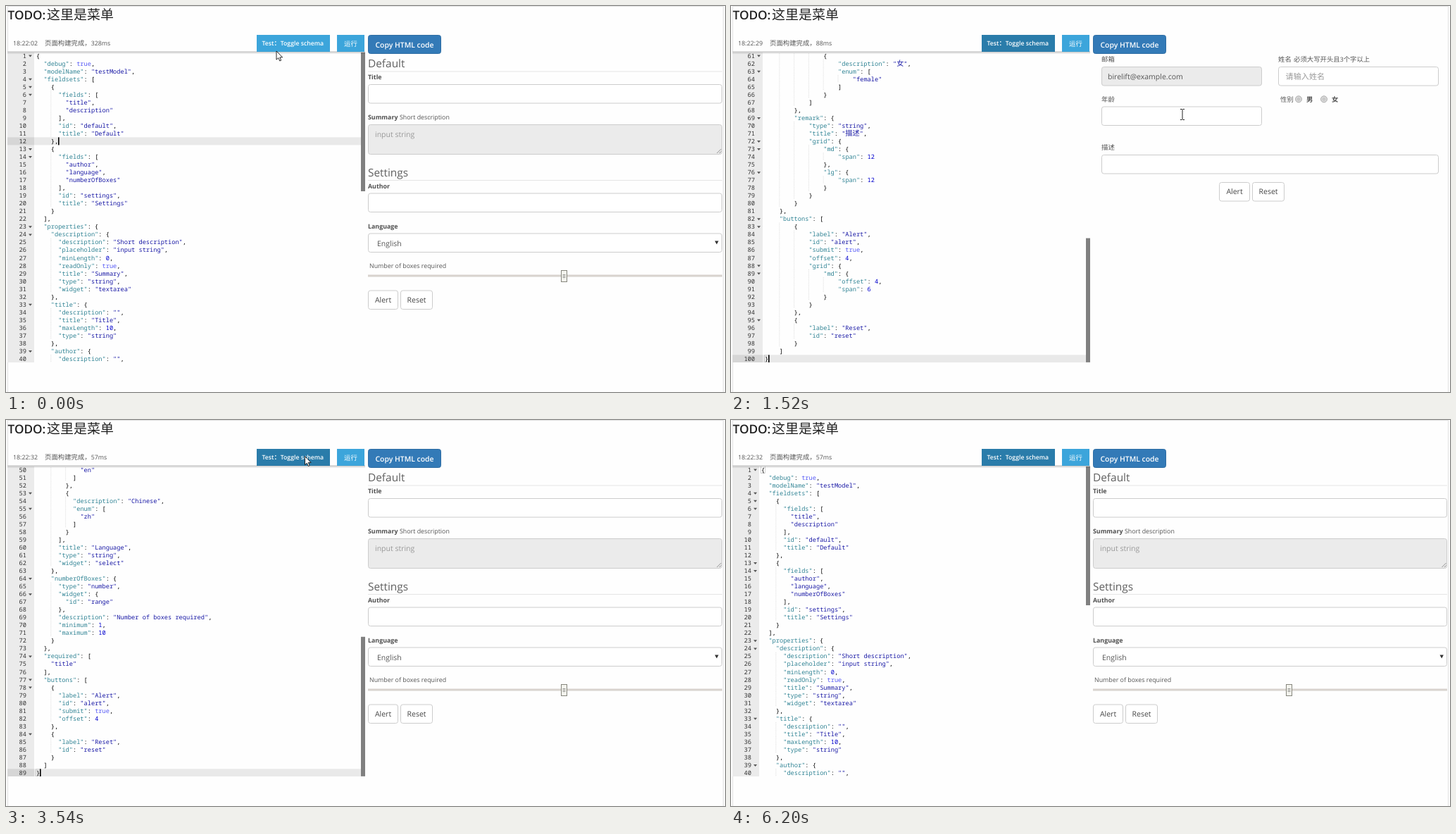
Animation of 1021x548 px, one loop 6.35 s. Source, as an HTML page:

```html
<!DOCTYPE html>
<html lang="zh-CN">
<head>
<meta charset="utf-8">
<title>Schema form editor</title>
<style>
html, body { margin: 0; width: 100%; height: 100%; overflow: hidden; background: #fefefe; }
#stage { display: block; width: 1021px; height: 548px; }
text { font-family: 'Open Sans', 'Noto Sans CJK SC', 'Noto Sans CJK', sans-serif; text-rendering: geometricPrecision; white-space: pre; }
.cjk { font-size: 1.06em; }
.code text { font: 8.667px 'Noto Sans Mono', 'Noto Sans CJK SC', 'Noto Sans CJK', monospace; }
.code .cjk { font-size: 10.2px; }
.key { fill: #318495; }
.str { fill: #1a1aa6; }
.num { fill: #0000cd; }
.bool { fill: #585cf6; }
</style>
</head>
<body>
<svg id="stage" viewBox="0 0 1021 548"></svg>
<script>
const LOOP = 6350, LINE = 11.035, CHAR = 5.2, TOP = 65, VIEW = 441;

const buttons = grid => [
  { label: 'Alert', id: 'alert', submit: true, offset: 4, ...grid },
  { label: 'Reset', id: 'reset' }
];
const option = (description, value) => ({ description, enum: [value] });

const fullSchema = {
  debug: true,
  modelName: 'testModel',
  fieldsets: [
    { fields: ['title', 'description'], id: 'default', title: 'Default' },
    { fields: ['author', 'language', 'numberOfBoxes'], id: 'settings', title: 'Settings' }
  ],
  properties: {
    description: {
      description: 'Short description', placeholder: 'input string', minLength: 0,
      readOnly: true, title: 'Summary', type: 'string', widget: 'textarea'
    },
    title: { description: '', title: 'Title', maxLength: 10, type: 'string' },
    author: { description: '', title: 'Author', type: 'string' },
    language: {
      description: '',
      oneOf: [option('English', 'en'), option('Chinese', 'zh')],
      title: 'Language', type: 'string', widget: 'select'
    },
    numberOfBoxes: {
      type: 'number', widget: { id: 'range' },
      description: 'Number of boxes required', minimum: 1, maximum: 10
    }
  },
  required: ['title'],
  buttons: buttons()
};

// Only the end of this schema ever scrolls into view.
const gridSchema = {
  properties: {
    sex: { oneOf: [option('女', 'female')] },
    remark: { type: 'string', title: '描述', grid: { md: { span: 12 }, lg: { span: 12 } } }
  },
  buttons: buttons({ grid: { md: { offset: 4, span: 6 } } })
};

const markCjk = s => s.replace(/[\u3000-\u9fff\uff00-\uffef]+/g, '<tspan class="cjk">$&</tspan>');
const text = (x, y, s, size = 8.85, fill = '#555', extra = '') =>
  `<text x="${x}" y="${y}" font-size="${size}" fill="${fill}" ${extra}>${markCjk(s)}</text>`;
const rect = (x, y, w, h, fill, extra = '') =>
  `<rect x="${x}" y="${y}" width="${w}" height="${h}" fill="${fill}" ${extra}/>`;
const label = (x, y, s, weight = 700) => text(x, y, s, 8.85, '#505050', `font-weight="${weight}"`);

function field(x, y, w, { h = 26.5, fill = '#fff', focus = false } = {}) {
  const box = (color, width) => rect(x + .5, y + .5, w - 1, h, fill, `rx="3" stroke="${color}" stroke-width="${width}"`);
  return focus
    ? box('#d3e8f9', 5) + box('#66afe9', 1.2) + rect(x + 10, y + 6, 1, 15, '#333')
    : box('#ccc', 1);
}
const button = (x, y, w, s) =>
  field(x, y, w) + text(x + w / 2, y + 17.3, s, 10.5, '#444', 'text-anchor="middle"');

function highlight(line) {
  return line.replace(/("[^"]*")(:?)|\b(true|\d+)\b/g, (all, str, colon, value) => {
    const kind = str ? (colon ? 'key' : 'str') : value === 'true' ? 'bool' : 'num';
    return `<tspan class="${kind}">${markCjk(str || value)}</tspan>${colon || ''}`;
  });
}

function makeDoc(schema, indent, total, gutter) {
  const lines = JSON.stringify(schema, null, indent).split('\n');
  const first = total - lines.length, left = gutter + 3;
  const body = lines.map((line, i) => {
    const y = (first + i) * LINE, code = line.trim(), depth = line.length - code.length;
    let out = `<text x="${gutter - 11}" y="${y + 8.6}" text-anchor="end" fill="#333">${first + i + 1}</text>`
      + `<text x="${left + depth * CHAR}" y="${y + 8.6}">${highlight(code)}</text>`;
    if (/[{[]$/.test(code)) out += `<path d="M${gutter - 8} ${y + 4.6}h5l-2.5 3z" fill="#555"/>`;
    for (let col = 4; col < depth; col += 4)
      out += `<path d="M${left + col * CHAR} ${y}v${LINE}" stroke="#ccc" stroke-width=".7" stroke-dasharray="1 1.2"/>`;
    return out;
  }).join('');
  return { body, total, gutter, left };
}
const fullDoc = makeDoc(fullSchema, 2, 89, 40);
const gridDoc = makeDoc(gridSchema, 4, 100, 45);

function editor({ body, total, gutter, left }, scroll, active, col, caret) {
  const y = (active - 1) * LINE, size = VIEW * VIEW / (total * LINE);
  const bracket = n => rect(left - .5, n * LINE + .5, CHAR + .6, LINE - 1, 'none', 'stroke="#c4c4c4" stroke-width=".8"');
  const caretLook = { on: [1.6, '#000'], idle: [.8, '#777'] }[caret];
  return `<svg class="code" x="0" y="${TOP}" width="510" height="${VIEW}">`
    + rect(2, 0, gutter - 2, VIEW, '#ebebeb')
    + `<g transform="translate(0 ${-scroll})">`
    + rect(2, y, gutter - 2, LINE, '#d6d6d6') + rect(gutter, y, 470, LINE, '#e9e9e9')
    + (active === total ? bracket(0) + bracket(total - 1) : '')
    + body
    + (caretLook ? rect(left + col * CHAR - .2, y, caretLook[0], LINE, caretLook[1]) : '')
    + '</g>'
    + rect(504, scroll * VIEW / (total * LINE), 6, size, '#808080')
    + '</svg>';
}

const heading = (y, s) => text(514, y, s, 15.4, '#606060') + rect(514, y + 5.5, 503, 1, '#e5e5e5');

const fullForm = heading(87, 'Default') + label(514, 104, 'Title') + field(514, 111, 503)
  + label(514, 161, 'Summary') + text(559, 161, 'Short description')
  + field(514, 168, 503, { h: 42, fill: '#ebebeb' }) + text(524, 185.5, 'input string', 10.5, '#999')
  + '<path d="M1009.5 209l6-6M1013 209l2.5-2.5" stroke="#777" stroke-width=".8"/>'
  + heading(241.5, 'Settings') + label(514, 258.5, 'Author') + field(514, 265.5, 503)
  + label(514, 315.5, 'Language') + field(514, 322.5, 503) + text(527, 340.5, 'English', 10.5)
  + '<path d="M1006.5 333.5h5.4l-2.7 5z" fill="#333"/>'
  + text(516, 372.3, 'Number of boxes required')
  + rect(514, 381.5, 503, 3, '#d8d3ce')
  + rect(788.5, 375.5, 8, 16, '#f4f4ee', 'stroke="#85857c"')
  + '<path d="M790.5 381.5h4m-4 2h4m-4 2h4" stroke="#777" stroke-width=".8"/>'
  + button(514, 403.5, 43, 'Alert') + button(560, 403.5, 46, 'Reset');

const radio = x => `<circle cx="${x}" cy="132.3" r="4.5" fill="#ddd" stroke="#aaa"/><circle cx="${x}" cy="132.3" r="2.6" fill="#c9c9c9"/>`;
const gridForm = focus => label(526, 78.6, '邮箱', 500)
  + field(526, 86, 228, { fill: '#ebebeb' }) + text(535, 103.5, 'birelift@example.com', 10.5)
  + label(777, 78.6, '姓名', 500) + text(799, 78.6, '必须大写开头且3个字以上')
  + field(777, 86, 228) + text(787.5, 103.7, '请输入姓名', 10.5, '#999')
  + label(526, 135.6, '年龄', 500) + field(526, 142.5, 228, { focus: focus === 'age' })
  + text(780, 135.6, '性别') + radio(806) + label(817, 135.6, '男') + radio(842) + label(853, 135.6, '女')
  + label(526, 204.4, '描述', 500) + field(526, 211, 479, { focus: focus === 'remark' })
  + button(693, 250, 44, 'Alert') + button(740, 250, 46, 'Reset');

// Timelines: each entry holds from its time until the next one.
const at = (track, t) => track.findLast(entry => entry[0] <= t);
const BEAM = true;
const mouse = [
  [0, 383.5, 63.5], [120, 399, 49], [270, 401, 47.5], [980, 455, 57], [1100, 520, 77], [1230, 562, 96],
  [1370, 624, 133], [1520, 641, 154, BEAM], [1650, 644, 157, BEAM], [2070, 643, 185], [2190, 641, 200.5],
  [2320, 641, 221, BEAM], [2750, 600, 178], [2870, 530, 105], [2990, 477, 61], [3140, 445, 55],
  [3260, 424, 51], [3930, 414, 110], [4050, 405, 173], [4200, 403, 200.5], [4900, 413, 194.5],
  [5180, 404, 188], [5300, 415, 150], [5420, 436, 115], [5540, 457, 82], [5690, 620, 250],
  [5810, 802, 429], [5960, 880, 480], [6080, 977, 534], [6200, 1100, 600]
];
const carets = [
  [0, 'on'], [270, 'off'], [680, 'on'], [1100, 'off'], [1520, 'on'], [1800, 'idle'], [3540, 'on'], [4200, 'off']
];
const scrolls = [
  [0, 0], [680, 60 * LINE], [3540, 49 * LINE], [4500, 257], [4620, 162.5], [4750, 68], [4900, 0]
];
const focuses = [[0, ''], [1800, 'age'], [2470, 'remark'], [3140, '']];
const logs = [[0, '18:22:02', '328ms'], [680, '18:22:29', '88ms'], [3540, '18:22:32', '57ms']];

function pointer([, x, y, beam]) {
  const shape = beam
    ? '<path d="M-3 -7.5h2.2l.8 .8.8-.8h2.2M0 -6.7v13.4M-3 7.5h2.2l.8-.8.8.8h2.2" fill="none" stroke="#222"/>'
    : '<path d="M.5 .5v12.2l2.8-2.5 2 4.3 1.9-.9-1.9-4.2h3.8z" fill="#fff" stroke="#111" stroke-width=".9"/>';
  return `<g transform="translate(${x} ${y})">${shape}</g>`;
}

function scene(t) {
  const isGrid = t >= 680 && t < 3540, doc = isGrid ? gridDoc : fullDoc;
  const pressed = (t >= 680 && t < 1800) || t >= 3540;
  const start = t < 680, [, clock, took] = at(logs, t);
  return rect(0, 0, 1021, 548, '#fefefe')
    + '<path d="M2 .5H1018M2.5 0V548M1018.5 0V548" stroke="#e2e2e2" fill="none"/>'
    + text(2.5, 19.2, 'TODO:', 17.2, '#222', 'font-weight="600"') + text(58, 19.4, '这里是菜单', 17.9, '#222')
    + text(10, 56.4, clock) + text(55, 56.4, '页面构建完成，' + took)
    + editor(doc, at(scrolls, t)[1], start ? 12 : doc.total, start ? 6 : 1, at(carets, t)[1])
    + rect(2, 64.5, 508, 1.5, '#c6c6c6') + rect(2, 66, 508, 2, '#000', 'opacity=".08"')
    + rect(356, 41, 104, 24, pressed ? '#2a7caa' : '#3ca5db')
    + text(363.5, 56.3, 'Test：Toggle schema', 8.7, '#fff', 'font-weight="600"')
    + rect(470, 41, 39, 24, '#3ca5db') + text(480, 56.5, '运行', 8.85, '#fff', 'font-weight="500"')
    + rect(514.5, 41.5, 103, 26, '#337ab7', 'rx="3" stroke="#2e6da4"')
    + text(566, 58.7, 'Copy HTML code', 10.4, '#fff', 'text-anchor="middle" font-weight="600"')
    + (isGrid ? gridForm(at(focuses, t)[1]) : fullForm)
    + pointer(at(mouse, t));
}

const stage = document.getElementById('stage');
let shown = '';
function draw() {
  const next = scene(performance.now() % LOOP);
  if (next !== shown) stage.innerHTML = shown = next;
  requestAnimationFrame(draw);
}
draw();
</script>
</body>
</html>
```
